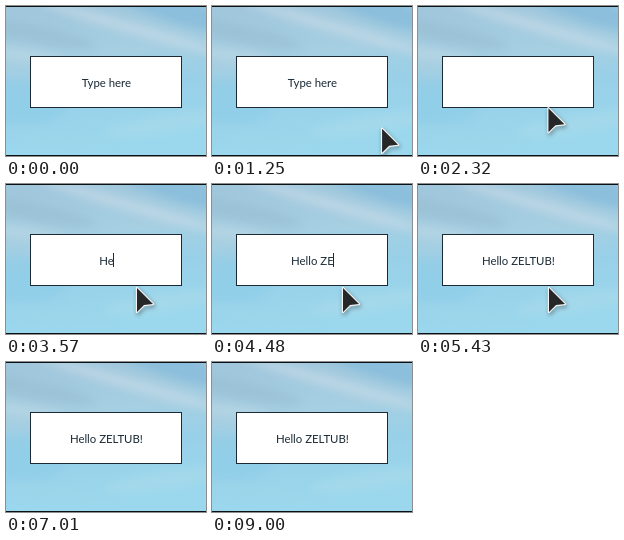
Recreate the animation shown at these times as an HTML page with a canvas. Size 200x150 px, loop 9630 ms.

```html
<!DOCTYPE html>
<html lang="en">
<head>
<meta charset="utf-8">
<title>Text box</title>
<style>
html, body { margin: 0; width: 100%; height: 100%; overflow: hidden; }
canvas { display: block; width: 200px; height: 150px; }
</style>
</head>
<body>
<canvas id="stage" width="200" height="150"></canvas>
<script>
const LOOP = 9630;
const INK = '#1b2a35';
const MESSAGE = 'Hello ZELTUB!';
const KEY_TIMES = [3340, 3570, 3670, 3800, 3960, 4090, 4320, 4480, 4710, 4800, 4900, 5030, 5430];
const CARET_TOGGLES = [2410, 2940, 3440, 3940, 4480, 4960, 5460, 5960, 6460, 6960, 7470, 7970, 8500, 9000];
const FOCUS_TIME = 1940;

const ctx = document.getElementById('stage').getContext('2d');
const sky = paintSky();

const countPassed = (times, t) => times.filter(time => time <= t).length;
const progress = (t, start, end) => Math.min(1, Math.max(0, (t - start) / (end - start)));
const mix = (a, b, p) => a + (b - a) * p;

function paintSky() {
  const layer = document.createElement('canvas');
  layer.width = 200;
  layer.height = 150;
  const g = layer.getContext('2d');
  const fade = g.createLinearGradient(0, 0, 20, 150);
  fade.addColorStop(0, '#a0c6dc');
  fade.addColorStop(0.4, '#a6cfe2');
  fade.addColorStop(0.65, '#98d0e8');
  fade.addColorStop(1, '#9bd8ee');
  g.fillStyle = fade;
  g.fillRect(0, 0, 200, 150);

  const streak = (x, y, rx, ry, angle, color) => {
    g.filter = 'blur(4px)';
    g.fillStyle = color;
    g.beginPath();
    g.ellipse(x, y, rx, ry, angle, 0, 7);
    g.fill();
  };
  streak(170, 4, 70, 13, 0.3, 'rgba(128,184,218,.65)');
  streak(125, 22, 100, 6, 0.28, 'rgba(200,221,232,.6)');
  streak(25, 27, 65, 9, 0.2, 'rgba(152,188,208,.6)');
  streak(10, 48, 50, 6, 0.12, 'rgba(192,218,230,.55)');
  streak(15, 95, 45, 22, 0.1, 'rgba(138,203,232,.5)');
  streak(160, 118, 65, 9, -0.15, 'rgba(172,218,234,.55)');
  streak(50, 132, 60, 7, 0.1, 'rgba(158,214,234,.5)');
  g.filter = 'none';

  g.fillStyle = '#0b1013';
  g.fillRect(0, 0, 200, 1);
  g.fillRect(0, 149, 200, 1);
  return layer;
}

function drawBox(t) {
  ctx.fillStyle = '#fff';
  ctx.fillRect(24, 50, 152, 52);
  ctx.strokeStyle = INK;
  ctx.lineWidth = 1;
  ctx.strokeRect(24.5, 50.5, 151, 51);

  const text = t < FOCUS_TIME ? 'Type here' : MESSAGE.slice(0, countPassed(KEY_TIMES, t));
  ctx.font = '11.4px Lato, sans-serif';
  ctx.fillStyle = INK;
  const half = ctx.measureText(text).width / 2;
  ctx.fillText(text, 100.4 - half, 81);
  if (countPassed(CARET_TOGGLES, t) % 2) {
    ctx.fillRect(Math.floor(100.4 + half), 69, 1, 14);
  }
}

function pointerAt(t) {
  if (t < 2170) {
    const left = 1 - progress(t, 1130, 1710);
    return [mix(125, 197, left ** 2), mix(85, 140, left ** 1.6)];
  }
  if (t < 6840) {
    const p = 1 - (1 - progress(t, 2140, 2400)) ** 2;
    return [mix(125, 131, p), mix(85, 104, p)];
  }
  const p = progress(t, 6840, 7010) ** 1.6;
  return [mix(131, 175, p), mix(104, 106, p)];
}

function drawPointer(x, y) {
  ctx.save();
  ctx.translate(x, y);
  ctx.beginPath();
  ctx.moveTo(0, 0);
  ctx.lineTo(16, 16);
  ctx.lineTo(7, 17);
  ctx.lineTo(0, 24);
  ctx.closePath();
  ctx.lineJoin = 'round';
  ctx.lineWidth = 2.4;
  ctx.strokeStyle = '#f4f4f4';
  ctx.shadowColor = 'rgba(0,0,0,.4)';
  ctx.shadowBlur = 4;
  ctx.shadowOffsetX = 1;
  ctx.shadowOffsetY = 2;
  ctx.stroke();
  ctx.shadowColor = 'transparent';
  ctx.fillStyle = '#252729';
  ctx.fill();
  ctx.restore();
}

const start = performance.now();

function render() {
  const t = (performance.now() - start) % LOOP;
  ctx.drawImage(sky, 0, 0);
  drawBox(t);
  if (t >= 1160 && t < 7010) drawPointer(...pointerAt(t));
  requestAnimationFrame(render);
}
render();
</script>
</body>
</html>
```
